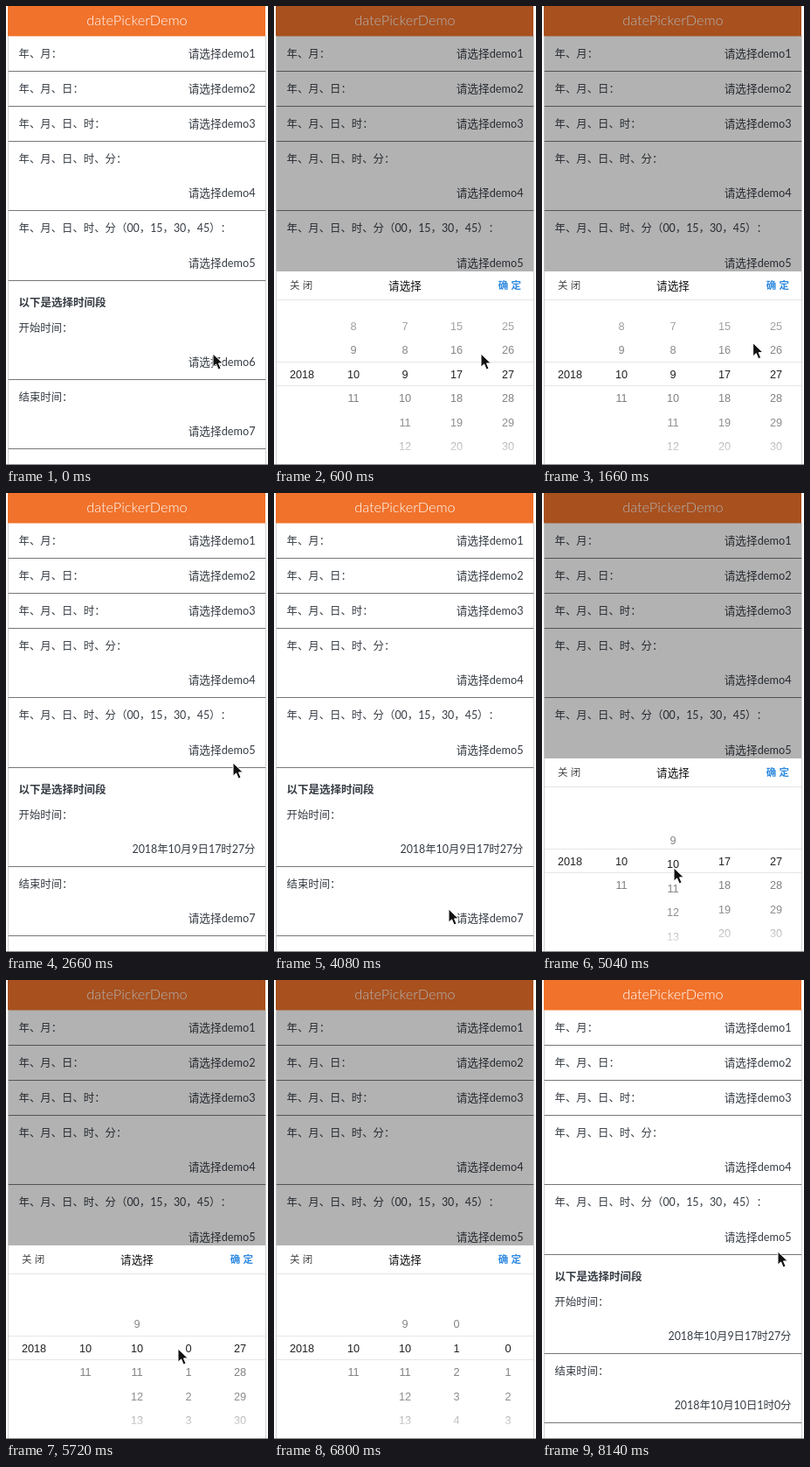
Recreate the animation shown at these times as an HTML page. Size 300 px wide and 524 px high, loop 8.16 s.

```html
<!DOCTYPE html>
<html lang="zh-CN">
<head>
<meta charset="utf-8">
<title>datePickerDemo</title>
<style>
html, body { margin: 0; width: 100%; height: 100%; overflow: hidden; background: #fff; }
svg { display: block; width: 300px; height: 524px; text-spacing-trim: space-all; }
.form { font-family: Lato, "Noto Sans CJK SC", "Noto Sans CJK", sans-serif; font-size: 12.4px; fill: #363c44; }
.picker { font-family: "Liberation Sans", "Noto Sans CJK SC", "Noto Sans CJK", sans-serif; font-size: 12.7px; fill: #222; }
.end { text-anchor: end; }
.mid { text-anchor: middle; }
.prompt { font-size: 12.7px; }
</style>
</head>
<body>
<svg viewBox="0 0 300 524">
  <defs>
    <linearGradient id="above" x1="0" y1="0" x2="0" y2="1">
      <stop offset="0" stop-color="#fff"/>
      <stop offset=".14" stop-color="#fff"/>
      <stop offset=".38" stop-color="#fff" stop-opacity=".58"/>
      <stop offset="1" stop-color="#fff" stop-opacity=".4"/>
    </linearGradient>
    <linearGradient id="below" x1="0" y1="0" x2="0" y2="1">
      <stop offset="0" stop-color="#fff" stop-opacity=".4"/>
      <stop offset=".55" stop-color="#fff" stop-opacity=".5"/>
      <stop offset=".85" stop-color="#fff" stop-opacity=".85"/>
      <stop offset="1" stop-color="#fff"/>
    </linearGradient>
    <clipPath id="wheelArea"><rect x="2" y="336" width="296" height="191"/></clipPath>
  </defs>
  <rect width="300" height="524" fill="#fff"/>
  <g class="form" id="form">
    <rect x="2" width="295" height="34.5" fill="#f0722b"/>
    <text class="mid" x="150" y="22.3" font-size="16.3" font-weight="300" fill="#fff">datePickerDemo</text>
  </g>
  <rect id="mask" x="2" width="295" height="524"/>
  <g class="picker" id="panel">
    <rect x="2" y="303" width="296" height="224" fill="#fff"/>
    <g id="wheels" clip-path="url(#wheelArea)"></g>
    <rect x="2" y="336" width="296" height="70" fill="url(#above)"/>
    <rect x="2" y="434" width="296" height="93" fill="url(#below)"/>
    <path d="M2 335.5H298M2 406.5H298M2 433.5H298" stroke="#e6e6e6"/>
    <text x="18" y="323.3" font-size="11.5" fill="#444">关 闭</text>
    <text class="mid" x="150" y="324" font-size="12.6" fill="#111">请选择</text>
    <text class="end" x="283" y="323.3" font-size="11.5" font-weight="600" fill="#2f8ae0">确 定</text>
  </g>
  <path d="M2.5 34V524M297.5 34V524" stroke="#c8c8c8" stroke-width=".8"/>
  <path d="M0 523.5H300" stroke="#8a8a8a"/>
  <path id="cursor" d="M0 0V15.2L3.6 11.9L6.2 18L9 16.8L6.5 10.9H11.4Z" fill="#111" stroke="#fff" stroke-width="1" stroke-linejoin="round"/>
</svg>
<script>
const LOOP = 8160, ROW = 27.5;
const $ = id => document.getElementById(id);

function add(parent, tag, attrs, text = '') {
  const node = document.createElementNS('http://www.w3.org/2000/svg', tag);
  for (const key in attrs) node.setAttribute(key, attrs[key]);
  node.textContent = text;
  return parent.appendChild(node);
}

// Form rows: label, label baseline, value baseline
const rows = [
  ['年、月：', 58.5, 58.5],
  ['年、月、日：', 98.5, 98.5],
  ['年、月、日、时：', 138.5, 138.5],
  ['年、月、日、时、分：', 178.5, 218],
  ['年、月、日、时、分（00，15，30，45）：', 258, 297.5],
  ['开始时间：', 371.5, 411],
  ['结束时间：', 450.5, 490]
];
const values = rows.map(([label, y, valueY]) => {
  add($('form'), 'text', { x: 14.5, y }, label);
  return add($('form'), 'text', { x: 285.5, y: valueY });
});
add($('form'), 'text', { x: 14.5, y: 343, 'font-weight': 700, 'font-size': 12.5 }, '以下是选择时间段');
for (const y of [74.5, 114.5, 154.5, 233.5, 313.5, 426.5, 505.5])
  add($('form'), 'path', { d: `M2 ${y}H298`, stroke: '#777' });

// Five wheels with a small pool of labels each
const wheels = [32, 91, 150, 209, 268].map(x =>
  Array.from({ length: 9 }, () => add($('wheels'), 'text', { x, class: 'mid' })));

const clamp = v => Math.max(0, Math.min(1, v));
const progress = (t, start, length) => clamp((t - start) / length);
const easeOut = p => 1 - (1 - p) ** 3;
const smooth = p => p * p * (3 - 2 * p);

function drawWheel(labels, position, min, max) {
  const first = Math.floor(position) - 4;
  labels.forEach((label, i) => {
    const n = first + i;
    label.textContent = n >= min && n <= max ? n : '';
    label.setAttribute('y', 424.6 + (n - position) * ROW);
  });
}

// Cursor stops: time, x, y
const stops = [
  [0, 237, 397], [1500, 237, 397], [2150, 267, 317], [2480, 265, 316],
  [2660, 260, 308], [3300, 238, 392], [3720, 200, 475], [4120, 200, 475],
  [4300, 199, 466], [4760, 151, 449], [4860, 151, 449], [5120, 151, 422],
  [5320, 151, 422], [5720, 197, 421], [5850, 204, 448], [5920, 204, 448],
  [6160, 204, 420], [6520, 206, 418], [6760, 304, 390], [6980, 304, 350],
  [7320, 267, 318], [7560, 267, 318], [7900, 270, 310], [LOOP, 270, 310]
];

function cursorAt(t) {
  const i = Math.max(1, stops.findIndex(stop => stop[0] > t));
  const [t0, x0, y0] = stops[i - 1], [t1, x1, y1] = stops[i];
  const p = smooth(progress(t, t0, t1 - t0));
  return [x0 + (x1 - x0) * p, y0 + (y1 - y0) * p];
}

function openness(t) {
  const cycle = (open, close) =>
    easeOut(progress(t, open, 250)) * (1 - smooth(progress(t, close, 160)));
  return Math.max(cycle(140, 2480), cycle(4135, 7560));
}

function setValue(index, chosen, date) {
  values[index].textContent = chosen ? date : `请选择demo${index + 1}`;
  values[index].setAttribute('class', chosen ? 'end' : 'end prompt');
}

function render(t) {
  const open = openness(t);
  $('panel').setAttribute('transform', `translate(0 ${(1 - open) * 224})`);
  $('mask').setAttribute('opacity', 0.3 * Math.min(1, open * 1.06));

  const second = t > 3000;
  const dayReset = t >= 5250, hourReset = t >= 6200;
  const day = 9 + easeOut(progress(t, 4880, 330));
  const hour = dayReset ? easeOut(progress(t, 5940, 260)) : 17;
  const minute = hourReset ? 0 : 27;
  drawWheel(wheels[0], 2018, 2018, 2018);
  drawWheel(wheels[1], 10, second ? 10 : 1, 11);
  drawWheel(wheels[2], second ? day : 9, second ? 9 : 1, 31);
  drawWheel(wheels[3], hour, second && !dayReset ? 17 : 0, 23);
  drawWheel(wheels[4], minute, second && !hourReset ? 27 : 0, 59);

  values.forEach((_, i) => setValue(i, false));
  setValue(5, t >= 2480, '2018年10月9日17时27分');
  setValue(6, t >= 7560, '2018年10月10日1时0分');

  $('cursor').setAttribute('transform', `translate(${cursorAt(t)})`);
}

const begin = performance.now();
function tick() {
  render((performance.now() - begin) % LOOP);
  requestAnimationFrame(tick);
}
tick();
</script>
</body>
</html>
```
